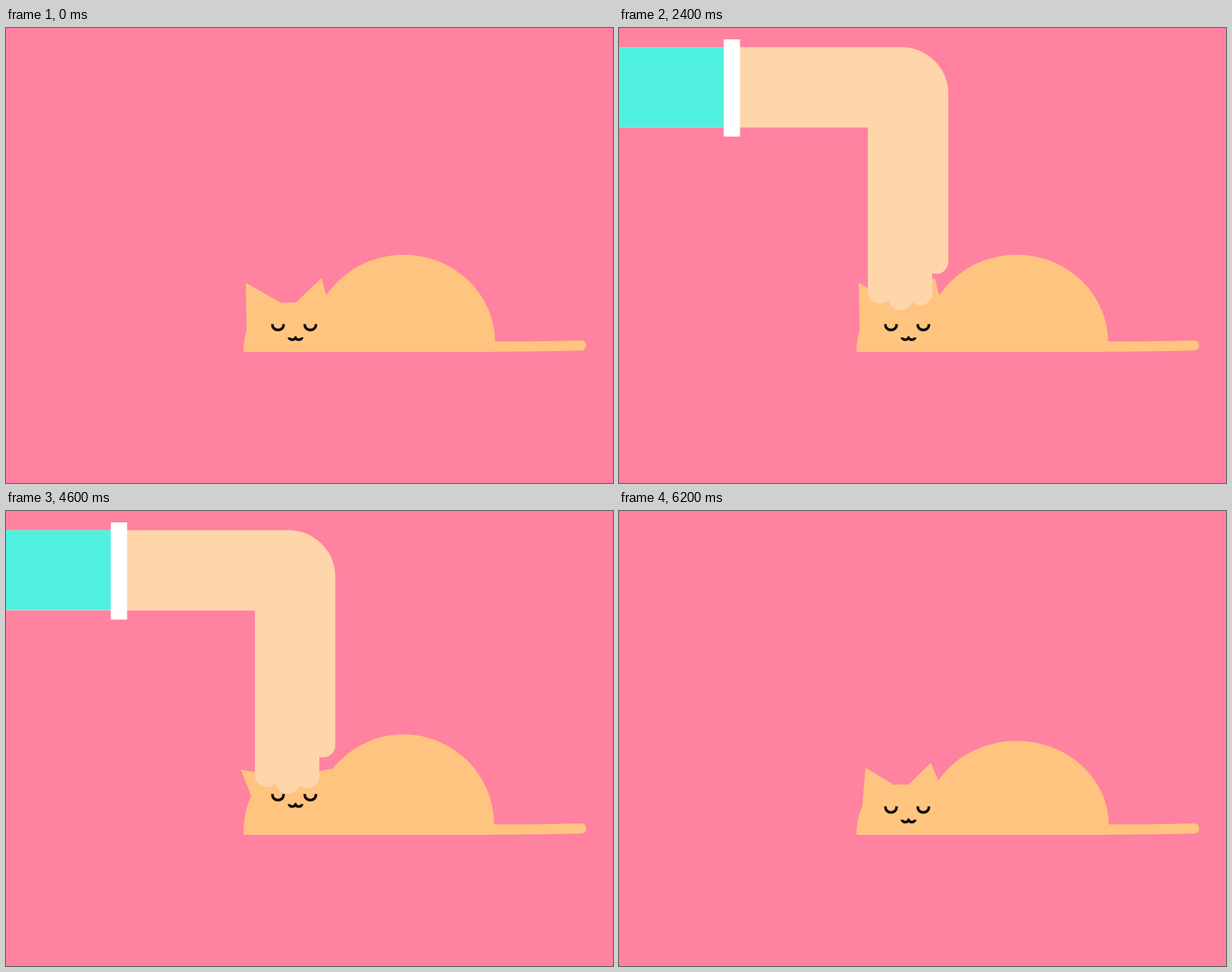
Animation, 800 px wide and 600 px high, one loop 6.24 s. Source, as an HTML page:

```html
<!DOCTYPE html>
<html lang="en">
<head>
<meta charset="utf-8">
<title>Cat nap</title>
<style>
  html, body { margin: 0; width: 100%; height: 100%; overflow: hidden; background: #ff82a0; }
  svg { display: block; width: 800px; height: 600px; }
  .cat { fill: #ffc480; }
  .tail { fill: none; stroke: #ffc480; stroke-width: 13.4; stroke-linecap: round; }
  .face { fill: none; stroke: #0c0808; stroke-width: 3.5; stroke-linejoin: round; }
  .finger { fill: none; stroke: #ffd5aa; stroke-width: 32; stroke-linecap: round; }
</style>
</head>
<body>
<svg viewBox="0 0 800 600">
  <clipPath id="floor"><rect width="800" height="427"/></clipPath>
  <path class="tail" id="tail"/>
  <g class="cat" clip-path="url(#floor)">
    <path id="body"/>
    <path id="head"/>
    <path id="ears"/>
  </g>
  <g class="face">
    <path id="eyes" d="M351.2 0v1.5a7.3 6.4 0 0 0 14.6 0v-1.5M393.8 0v1.5a7.3 6.4 0 0 0 14.6 0v-1.5"/>
    <path id="mouth" d="M373 0a4.3 3.1 0 0 0 8.6 0a4.3 3.1 0 0 0 8.6 0"/>
  </g>
  <g id="hand"></g>
  <g id="sleeve">
    <rect x="-300" y="25.4" width="440" height="105.2" fill="#50f0e0"/>
    <rect x="138" y="15" width="21.6" height="128.2" fill="#fff"/>
  </g>
</svg>
<script>
const LOOP = 6240, FLOOR = 427;
const $ = id => document.getElementById(id);
const draw = (id, d) => $(id).setAttribute('d', d);
const shift = (id, x, y) => $(id).setAttribute('transform', `translate(${x} ${y})`);
const mix = (a, b, u) => a + (b - a) * u;

// Sine ease from 0 to 1 while t runs from a to b
function ease(t, a, b) {
  const u = Math.min(1, Math.max(0, (t - a) / (b - a)));
  return (1 - Math.cos(Math.PI * u)) / 2;
}

function drawTail(t) {
  const s = t < 2000 ? t - 640 : t - 3020;
  const w = -40 * ease(s, 0, 300) + 46 * ease(s, 320, 580) - 6 * ease(s, 580, 860);
  draw('tail', `M636 420C${680 - w * 0.2} 420 720 ${420 + w * 0.36} 758 ${418.6 + w}`);
}

function drawCat(t) {
  const drop = ease(t, 5760, 6200);
  const breath = ease(t, 0, 680) - ease(t, 1000, 1960);
  const lean = ease(t, 2560, 3600) * (1 - drop);
  const rise = ease(t, 3920, 5120) * (1 - drop);

  const top = 299 - 4.5 * (breath + lean) + 4 * drop;
  const size = (FLOOR - top) / 132.5;
  const rx = 119.3 + (1 - size) * 36, ry = 119.3 * size, base = top + ry;
  draw('body', `M${524 - rx} 428V${base}A${rx} ${ry} 0 0 1 ${524 + rx} ${base}V428Z`);

  const h = 362 - 9.4 * breath - 12 * lean - 8 * rise - 1.5 * drop;
  const side = mix(FLOOR, h, 0.64), bulge = 62 * 0.64;
  draw('head', `M313 ${FLOOR}C313 ${side} ${375 - bulge} ${h} 375 ${h}S437 ${side} 437 ${FLOOR}Z`);

  // Ears fold flat under the hand and perk inwards on the drop
  const flat = 0.87 * lean + 0.13 * rise;
  const pt = (x0, y0, x1, y1) => `${mix(x0, x1, flat)} ${h + mix(y0, y1, flat)}`;
  const left = [pt(363, 1, 353, 4), pt(316 + 9 * drop, -26 + 4 * drop, 309, -3), pt(317.3 + 2 * drop, 42, 323, 29)];
  const right = [pt(382, 0, 393, 2), pt(416 - 5 * drop, -32.5 + 4 * drop, 430, -4), pt(428, 13, 424, 20)];
  draw('ears', [left, right].map(ear => `M${ear.join('L')}L375 ${h + 50}Z`).join(''));

  const eye = 390.4 - 2.9 * breath - 13.4 * lean - 6 * rise - 0.8 * drop;
  shift('eyes', 0, eye);
  shift('mouth', 0, eye + 17.5 - 4.5 * flat);
}

// Lane centre and resting fingertip, thumb last
const fingers = [[344, 348], [371, 357], [397, 350], [418, 309]].map(([x, end], i) => {
  const el = document.createElementNS('http://www.w3.org/2000/svg', 'path');
  el.setAttribute('class', 'finger');
  $('hand').append(el);
  return { el, x, end, i, y: 459.2 - x, r: Math.max(0, x - 372) };
});

// Distance still to go on the way in, or already gone on the way out
function retreat(t, near, tau, far) {
  if (t < 2600) return near * Math.exp((1720 - t) / tau);
  return t > 4600 ? far * ((t - 4600) / 480) ** 3 : 0;
}

function drawArm(t) {
  const away = retreat(t, 44, 170, 154);
  const stroke = t > 2600 && t < 4520 ? Math.sin(2 * Math.PI * (t - 2600) / 1920) : 0;
  for (const { el, x, y, r, end, i } of fingers) {
    const sway = i < 3 ? 9.3 * stroke * (stroke < 0 ? i / 2 : 1) : 0;
    const bend = r ? `A${r} ${r} 0 0 1 ${x} ${y + r}` : '';
    el.setAttribute('d', `M-40 ${y}H${x - r}${bend}V256C${x} 290 ${x + sway * 0.4} ${end - 30} ${x + sway} ${end}`);
    const len = el.getTotalLength() - away * Math.min(1, 0.88 + 0.07 * i);
    el.style.display = len > 0 ? '' : 'none';
    if (len > 0) el.setAttribute('stroke-dasharray', `${len} 3000`);
  }
  shift('sleeve', -Math.min(retreat(t, 14, 130, 54.4), 400), 0);
}

const start = performance.now();
function frame() {
  const t = (performance.now() - start) % LOOP;
  drawTail(t);
  drawCat(t);
  drawArm(t);
  requestAnimationFrame(frame);
}
frame();
</script>
</body>
</html>
```
